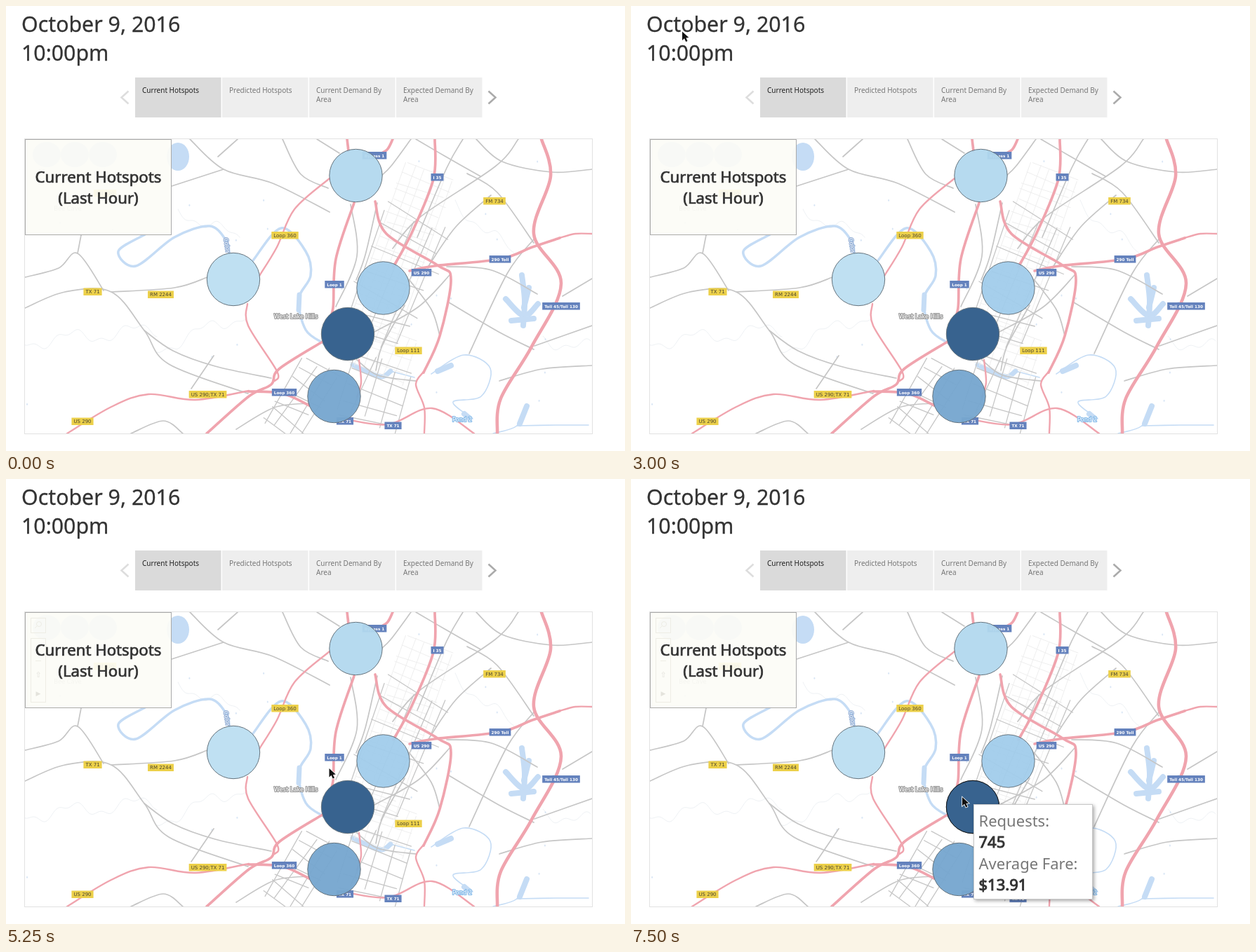
Write an HTML page with a canvas that moves like this. It is 882 px wide and 635 px high and loops after 8 s.

```html
<!DOCTYPE html>
<html lang="en">
<head>
<meta charset="utf-8">
<title>Hotspots</title>
<style>
html, body { margin: 0; width: 100%; height: 100%; overflow: hidden; background: #fff; }
canvas { display: block; }
</style>
</head>
<body>
<canvas id="stage" width="882" height="635"></canvas>
<script>
const W = 882, H = 635, LOOP = 8000, STEP = 250;
const SANS = '"Noto Sans", "Open Sans", sans-serif';
const MAP_SANS = '"DejaVu Sans", sans-serif';
const GRAY = '#c6c6c6', PINK = '#f0a4ae', WATER = '#c5dcf5';
const stage = document.getElementById('stage').getContext('2d');
const base = document.createElement('canvas');
base.width = W;
base.height = H;
let g = base.getContext('2d');

let seed = 7;
function random() {
  seed = (seed * 16807) % 2147483647;
  return seed / 2147483647;
}

// Smooth curve through every point of "x,y x,y ..."
function curve(points, color, width) {
  const p = points.split(' ').map(s => s.split(',').map(Number));
  const at = i => p[Math.max(0, Math.min(p.length - 1, i))];
  g.beginPath();
  g.moveTo(...p[0]);
  for (let i = 0; i < p.length - 1; i++) {
    const [a, b, c, d] = [at(i - 1), at(i), at(i + 1), at(i + 2)];
    g.bezierCurveTo(
      b[0] + (c[0] - a[0]) / 6, b[1] + (c[1] - a[1]) / 6,
      c[0] - (d[0] - b[0]) / 6, c[1] - (d[1] - b[1]) / 6, c[0], c[1]);
  }
  g.strokeStyle = color;
  g.lineWidth = width;
  g.stroke();
}

function curves(list, color, width) {
  list.forEach(points => curve(points, color, width));
}

function text(str, x, y, font, color, align = 'left', heavier = 0) {
  g.font = font;
  g.fillStyle = g.strokeStyle = color;
  g.textAlign = align;
  g.fillText(str, x, y);
  if (!heavier) return;
  g.lineWidth = heavier;
  g.strokeText(str, x, y);
}

function box(x, y, w, h, fill, edge) {
  g.fillStyle = fill;
  g.fillRect(x, y, w, h);
  if (!edge) return;
  g.strokeStyle = edge;
  g.lineWidth = 1;
  g.strokeRect(x + 0.5, y + 0.5, w - 1, h - 1);
}

function sign(str, x, y, font, fill, color) {
  g.font = font + MAP_SANS;
  const w = g.measureText(str).width + 6;
  box(x - w / 2, y - 5, w, 10.5, fill);
  text(str, x, y + 2.5, g.font, color, 'center');
}

const yellowSign = (str, x, y) => sign(str, x, y, '7px ', '#ecd04a', '#4d4630');
const blueSign = (str, x, y) => sign(str, x, y, 'bold 5.7px ', '#6482bd', '#fff');

function haloText(str, x, y, color, halo) {
  g.font = '8.3px ' + MAP_SANS;
  g.textAlign = 'center';
  g.strokeStyle = halo;
  g.lineWidth = 2.2;
  g.strokeText(str, x, y);
  text(str, x, y, g.font, color, 'center');
}

function chevron(x, y, dx, color) {
  g.strokeStyle = color;
  g.lineWidth = 2.5;
  g.beginPath();
  g.moveTo(x - dx, y - 9);
  g.lineTo(x, y);
  g.lineTo(x - dx, y + 9);
  g.stroke();
}

function disc(x, y, rx, ry, fill) {
  g.beginPath();
  g.ellipse(x, y, rx, ry, 0, 0, Math.PI * 2);
  g.fillStyle = fill;
  g.fill();
}

function spot(x, y, color, edge = '#65737d') {
  disc(x, y, 37.7, 37.7, color);
  g.strokeStyle = edge;
  g.lineWidth = 1;
  g.stroke();
}

// Slanted street grid, its lines a little uneven
function streets(x, y, cols, rows, step, angle, color, width) {
  g.save();
  g.translate(x, y);
  g.rotate(angle);
  g.strokeStyle = color;
  g.lineWidth = width;
  g.beginPath();
  const shift = () => (random() - 0.5) * step * 0.6;
  for (let i = 0; i <= cols; i++) {
    g.moveTo(i * step + shift(), shift());
    g.lineTo(i * step + shift(), rows * step + shift());
  }
  for (let j = 0; j <= rows; j++) {
    g.moveTo(shift(), j * step + shift());
    g.lineTo(cols * step + shift(), j * step + shift());
  }
  g.stroke();
  g.restore();
}

// Faint winding creek
function creek(x, y, length, slope) {
  g.beginPath();
  for (let s = 0; s < length; s += 2) {
    const sway = 9 * Math.sin(s / 14) + 4 * Math.sin(s / 5 + x);
    g.lineTo(x + s, y + s * slope + sway);
  }
  g.strokeStyle = '#eaeef1';
  g.lineWidth = 0.8;
  g.stroke();
}

function drawWater() {
  creek(27, 480, 190, -0.1);
  creek(215, 490, 130, -0.4);
  creek(245, 290, 90, 0.5);
  creek(640, 280, 85, 0.9);
  creek(765, 475, 70, 0.2);
  curves([
    '198,326 160,350 185,371 240,330 290,314 314,335 318,352',
    '352,363 392,317 427,350 434,385 417,418 427,462 452,481',
  ], WATER, 3.5);
  curves(['494,512 532,529 548,521', '418,412 417,434'], WATER, 7);
  curves([
    '548,521 582,530', '606,525 652,498 690,517 677,557 637,565 665,589',
    '694,610 728,599 742,570', '728,599 783,598 830,598',
  ], WATER, 1.6);
  // Reservoir with its side arms
  curves(['735,384 739,420 737,456', '712,418 738,442 758,425', '745,402 738,430', '720,449 752,446'], WATER, 8);
  curves(['732,596 742,571', '615,521 634,513', '653,582 660,588'], WATER, 8);
  disc(245, 215, 16, 20, WATER);
  for (let i = 0; i < 3; i++) disc(58 + i * 40, 212, 20, 18, WATER);
  for (let i = 0; i < 25; i++) disc(30 + random() * 800, 200 + random() * 400, 1, 1.5, '#d9e6f5');
}

function drawGrayRoads() {
  streets(570, 225, 5, 18, 14, 0.35, '#ececec', 0.8);
  streets(500, 450, 6, 4, 15, 0.35, '#ececec', 0.8);
  streets(548, 290, 3, 6, 30, 0.4, GRAY, 1.3);
  streets(500, 497, 4, 4, 21, 0.35, GRAY, 1.3);
  streets(425, 500, 3, 6, 18, 0.55, GRAY, 1.3);
  curves([
    '27,431 84,408 150,408 197,463 232,511 345,553',
    '27,387 75,374 102,353 139,406',
    '150,408 240,402 287,387',
    '102,353 107,327',
    '197,463 238,492 298,514 378,531',
    '178,610 224,592 252,610',
    '296,499 264,546',
    '262,190 310,233 380,253 461,294',
    '330,190 302,215',
    '236,257 310,233',
  ], GRAY, 1.7);
  curves([
    '394,190 420,240 459,260',
    '443,190 475,210',
    '584,190 625,214 676,243',
    '651,190 628,231 586,330',
    '670,190 707,222 777,237 835,233',
    '730,190 697,229 589,302 551,346',
    '657,239 700,266 752,338',
    '691,270 641,315 602,371',
    '577,190 549,228 535,242',
  ], GRAY, 1.7);
  curves([
    '752,333 714,382 660,496',
    '628,372 692,377 757,411',
    '631,423 702,465 752,490',
    '703,535 764,518 835,513',
    '793,414 835,389',
    '753,485 835,456',
    '491,283 500,357 470,429',
    '529,281 512,355 499,391',
    '574,390 606,433 618,470',
    '525,465 588,429 633,383',
    '568,427 536,485 527,520',
    '500,505 530,527 584,535',
    '328,604 382,573 431,567',
  ], GRAY, 1.7);
}

function drawPinkRoads() {
  curves([
    '461,246 411,290 386,344 361,385',
    '344,425 345,456 386,521 383,535',
    '87,610 150,572 203,554 270,562 346,549',
    '595,522 584,540 596,573 596,610',
    '485,590 545,597 607,574 667,610',
    '503,505 506,537 500,558',
    '789,331 811,325 835,325',
  ], PINK, 2.4);
  curves([
    '486,190 488,207',
    '496,281 470,361 466,431 458,450',
    '451,479 389,518 378,540 346,557 286,610',
    '345,550 394,553 432,570',
    '551,190 543,205 527,214',
    '611,190 609,247 578,324 552,372',
    '526,279 542,325 615,370 634,390 618,471 595,523',
    '575,378 610,371 704,361 750,344 789,331',
  ], PINK, 3.7);
  curve('763,190 776,243 752,325 791,396 749,486 705,560 700,610', PINK, 4.6);
}

function drawLabels() {
  yellowSign('Loop 360', 397.5, 327);
  yellowSign('FM 734', 696, 278);
  yellowSign('TX 71', 123.5, 407.5);
  yellowSign('RM 2244', 220.5, 411.5);
  yellowSign('Loop 111', 573.5, 491.5);
  yellowSign('US 290;TX 71', 287.5, 554);
  yellowSign('US 290', 109, 592.5);
  yellowSign('RM 620', 141, 267);
  blueSign('Bypass 1', 525, 213);
  blueSign('I 35', 614.5, 244);
  blueSign('290 Toll', 704, 361);
  blueSign('US 290', 592, 380);
  blueSign('Loop 1', 468, 397);
  blueSign('Toll 45/Toll 130', 791, 428);
  blueSign('Loop 360', 396.5, 551);
  blueSign('TX 71', 551.5, 598.5);
  blueSign('TX 71', 483, 592);
  haloText('West Lake Hills', 413, 446, '#fff', '#999');
  haloText('Pond 2', 650, 593, '#fff', '#80b8e8');
  haloText('Bee Cave', 88, 292, '#999', '#fff');
  g.save();
  g.translate(312, 342);
  g.rotate(1.4);
  haloText('Color', 0, 0, '#fff', '#91add5');
  g.restore();
}

function drawTabs() {
  const tabs = ['Current Hotspots', 'Predicted Hotspots', 'Current Demand By/Area', 'Expected Demand By/Area'];
  tabs.forEach((label, i) => {
    const x = 184 + i * 124;
    box(x, 102, 122.5, 57, i ? '#eee' : '#dadada');
    label.split('/').forEach((s, j) =>
      text(s, x + 10, 123.5 + j * 13.5, '10px ' + SANS, i ? '#777' : '#222'));
  });
  chevron(164.5, 130.5, -10, '#ddd');
  chevron(697.5, 130.5, 10, '#aaa');
}

function drawBase() {
  box(0, 0, W, H, '#fff');
  text('October 9, 2016', 22, 36.5, '30.3px ' + SANS, '#333', 'left', 0.3);
  text('10:00pm', 22, 78, '30.3px ' + SANS, '#333', 'left', 0.3);
  drawTabs();
  g.save();
  g.beginPath();
  g.rect(27, 190, 808, 420);
  g.clip();
  g.lineCap = g.lineJoin = 'round';
  drawWater();
  drawGrayRoads();
  drawPinkRoads();
  drawLabels();
  g.restore();
  g.strokeStyle = '#e2e2e2';
  g.lineWidth = 1;
  g.strokeRect(26.5, 189.5, 809, 421);
  spot(498.5, 242, 'rgba(178,216,239,.94)');
  spot(324, 390, 'rgba(188,223,242,.95)');
  spot(537.5, 402.5, 'rgba(162,205,235,.95)');
  spot(487, 468, '#38638f');
  spot(467.5, 557, 'rgba(119,167,208,.96)');
  box(27, 190, 209, 137, 'rgba(252,252,247,.93)', '#aaa');
  text('Current Hotspots', 131.5, 251.5, '22.2px ' + SANS, '#333', 'center', 0.7);
  text('(Last Hour)', 131.5, 281.5, '22.2px ' + SANS, '#333', 'center', 0.7);
}

// Map tools, barely visible through the title panel
function drawTools() {
  g.strokeStyle = '#eeede5';
  g.lineWidth = 1;
  g.strokeRect(35.5, 198.5, 21, 21);
  g.strokeRect(35.5, 227.5, 21, 91);
  g.beginPath();
  g.arc(47, 207, 3.5, 0, Math.PI * 2);
  g.moveTo(44, 210);
  g.lineTo(41, 213);
  g.moveTo(42, 259.5);
  g.lineTo(50, 259.5);
  g.stroke();
  text('⇧', 46, 283, '11px ' + MAP_SANS, '#e4e3dc', 'center');
  text('▶', 46, 309, '9px ' + MAP_SANS, '#e4e3dc', 'center');
}

function drawTooltip(x, y) {
  g.save();
  g.shadowColor = 'rgba(0,0,0,.35)';
  g.shadowBlur = 5;
  g.shadowOffsetX = g.shadowOffsetY = 2;
  box(x, y, 170, 136, '#fff');
  g.restore();
  box(x, y, 170, 136, '#fff', '#c8c8c8');
  ['Requests:', '745', 'Average Fare:', '$13.91'].forEach((s, i) => {
    const value = i % 2;
    text(s, x + 7.5, y + 32 + i * 30.3, '22px ' + SANS, value ? '#333' : '#777', 'left', value);
  });
}

const pointer = new Path2D('M0 0V12.5L3 9.8 5.2 14.5 7.5 13.5 5.4 8.9 9.3 8.6Z');

function drawCursor(x, y) {
  g.save();
  g.translate(x, y);
  g.strokeStyle = '#fff';
  g.lineWidth = 1.6;
  g.stroke(pointer);
  g.fillStyle = '#111';
  g.fill(pointer);
  g.restore();
}

// Key positions of the pointer: time, x, y
const keys = [
  [250, 93, 28], [500, 72, 23.5], [2750, 72, 26.5], [3000, 73, 36.5], [3250, 103, 95],
  [3500, 204, 192], [4000, 311.5, 262], [4750, 424.5, 328], [5250, 460.5, 413],
  [5500, 470, 445], [5750, 472, 454],
];

function cursorAt(t) {
  const next = keys.findIndex(k => k[0] > t);
  if (next < 0) return keys[keys.length - 1].slice(1);
  const a = keys[next - 1], b = keys[next];
  const f = (t - a[0]) / (b[0] - a[0]);
  return [a[1] + (b[1] - a[1]) * f, a[2] + (b[2] - a[2]) * f];
}

function draw(time) {
  const t = Math.floor(time / STEP) * STEP;
  g.drawImage(base, 0, 0);
  if (t >= 3750) drawTools();
  if (t < keys[0][0]) return;
  const [x, y] = cursorAt(t);
  if (t >= 5500) {
    spot(487, 468, '#38638f', '#111');
    drawTooltip(x + 16, y + 10);
  }
  drawCursor(x, y);
}

drawBase();
g = stage;
const start = performance.now();
function tick() {
  draw((performance.now() - start) % LOOP);
  requestAnimationFrame(tick);
}
tick();
</script>
</body>
</html>
```
